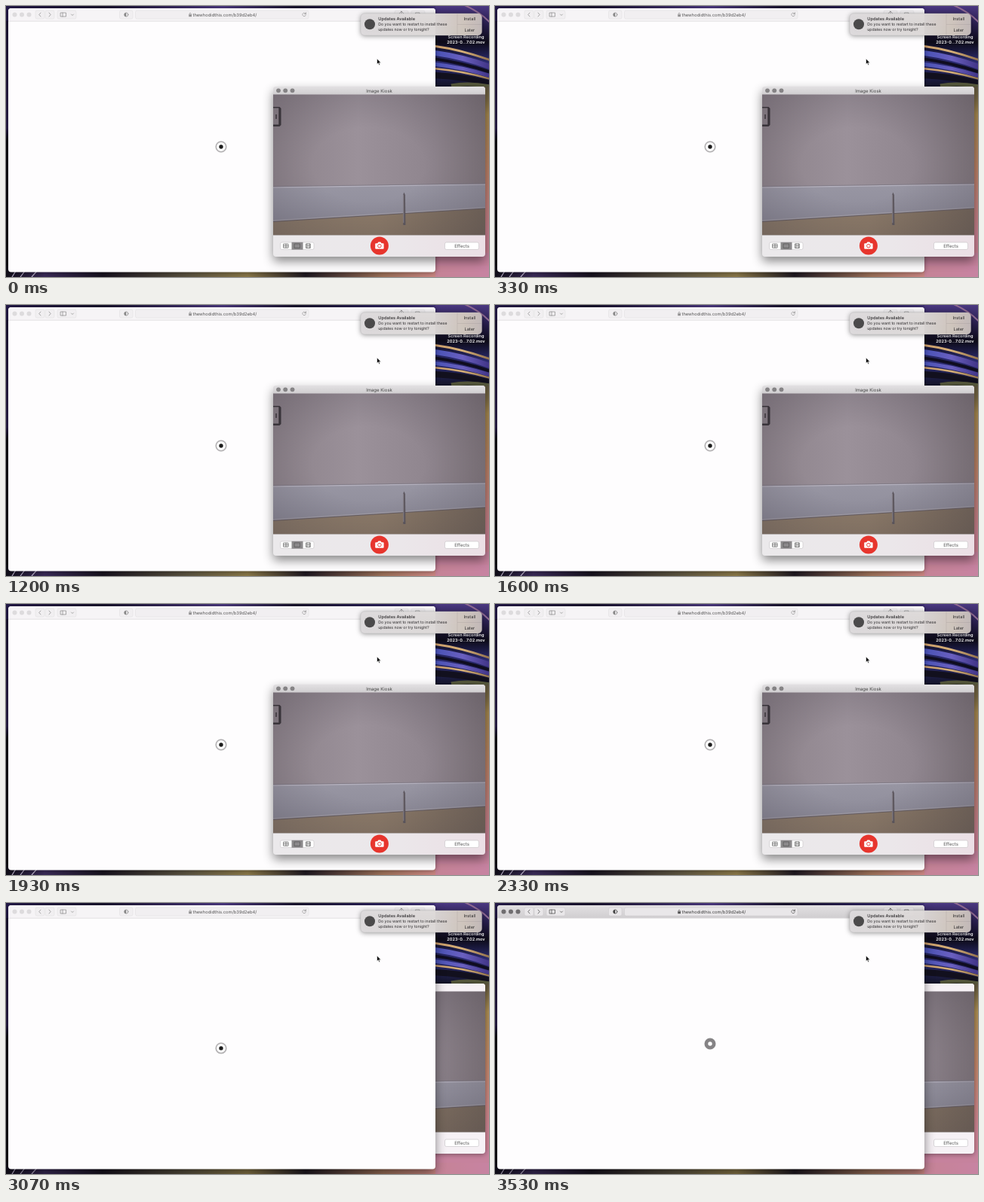
Recreate the animation shown at these times as an HTML page. Size 640 px wide and 360 px high, loop 3.59 s.

```html
<!DOCTYPE html>
<html lang="en">
<head>
<meta charset="utf-8">
<title>Desktop recording</title>
<style>
html, body { margin: 0; width: 100%; height: 100%; overflow: hidden; background: #0b0a14; }
svg { display: block; width: 640px; height: 360px; font-family: Inter, "Open Sans", sans-serif; text-rendering: geometricPrecision; }
.mid { text-anchor: middle; }
.line { fill: none; stroke: #777; stroke-width: .7; stroke-linecap: round; stroke-linejoin: round; }
.soft { filter: drop-shadow(0 1px 3px #0006); }
.deep { filter: drop-shadow(0 6px 7px #0007); }

#browser .bar { fill: #f6f4f6; }
#browser .light { fill: #dddbdd; }
#browser .tools { opacity: .6; }
#browser .field { fill: #f1eff1; stroke: #dfdddf; stroke-width: .5; }
#browser .url { fill: #555; font-size: 5.8px; }
.active #browser .bar { fill: url(#chrome); }
.active #browser .light { fill: #706e70; }
.active #browser .tools { opacity: 1; }
.active #browser .field { fill: #e9e7e9; stroke: #c9c7c9; }
.active #browser .url { fill: #3c3c3c; }

#radio .ring { fill: #fff; stroke: #b2b0b2; stroke-width: 1.5; }
#radio .dot { fill: #1d1d1d; }
.active #radio .ring { fill: #858385; stroke: #858385; }
.active #radio .dot { fill: #fff; }

#booth .bar { fill: url(#chrome); }
#booth .base { fill: url(#tray); }
.behind #booth .bar, .behind #booth .base { fill: #f6f1f5; }
</style>
</head>
<body>
<svg id="stage" viewBox="0 0 640 360">
<defs>
  <linearGradient id="chrome" x2="0" y2="1"><stop stop-color="#e2e0e2"/><stop offset="1" stop-color="#d0ced0"/></linearGradient>
  <linearGradient id="tray"><stop stop-color="#ebe9eb"/><stop offset=".6" stop-color="#ebe7ea"/><stop offset="1" stop-color="#ebdfe5"/></linearGradient>
  <linearGradient id="top"><stop stop-color="#241a48"/><stop offset=".2" stop-color="#17112b"/><stop offset=".45" stop-color="#4b3880"/><stop offset=".6" stop-color="#17122b"/><stop offset=".8" stop-color="#2c2260"/><stop offset="1" stop-color="#54408c"/></linearGradient>
  <linearGradient id="bottom"><stop stop-color="#100d18"/><stop offset=".08" stop-color="#3a2a58"/><stop offset=".2" stop-color="#17121e"/><stop offset=".38" stop-color="#5c5440"/><stop offset=".5" stop-color="#8a7848"/><stop offset=".62" stop-color="#1e1820"/><stop offset=".78" stop-color="#9c7058"/><stop offset=".88" stop-color="#c98580"/><stop offset="1" stop-color="#cf86a0"/></linearGradient>
  <linearGradient id="left" x2="0" y2="1"><stop stop-color="#1a1330"/><stop offset=".45" stop-color="#2b1f4a"/><stop offset=".5" stop-color="#08070c"/><stop offset="1" stop-color="#0c0a12"/></linearGradient>
  <linearGradient id="right" x2="0" y2="1"><stop offset=".28" stop-color="#4c4838"/><stop offset=".4" stop-color="#a88a50"/><stop offset=".6" stop-color="#c08468"/><stop offset=".85" stop-color="#cc8294"/></linearGradient>
  <linearGradient id="night" x2="0" y2="1"><stop stop-color="#4a3880"/><stop offset=".25" stop-color="#251c48"/><stop offset=".45" stop-color="#0d0b18"/><stop offset=".7" stop-color="#2c2c72"/><stop offset="1" stop-color="#15152a"/></linearGradient>
  <linearGradient id="gold"><stop stop-color="#c89a68"/><stop offset=".5" stop-color="#d6b078"/><stop offset="1" stop-color="#8a6a48"/></linearGradient>
  <linearGradient id="blue"><stop stop-color="#4450b4"/><stop offset=".5" stop-color="#6a60c0"/><stop offset="1" stop-color="#3c2f80"/></linearGradient>
  <linearGradient id="wall"><stop stop-color="#8c828a"/><stop offset=".4" stop-color="#9b919a"/><stop offset=".75" stop-color="#8f858e"/><stop offset="1" stop-color="#847a80"/></linearGradient>
  <linearGradient id="board" x2="0" y2="1"><stop stop-color="#9896a3"/><stop offset="1" stop-color="#8c8a98"/></linearGradient>
  <linearGradient id="floor"><stop stop-color="#8a7968"/><stop offset=".5" stop-color="#8d7b69"/><stop offset="1" stop-color="#7a6b5d"/></linearGradient>
  <radialGradient id="shade" cx=".45" cy=".5" r=".75"><stop offset=".35" stop-color="#38323c" stop-opacity="0"/><stop offset="1" stop-color="#38323c" stop-opacity=".32"/></radialGradient>
  <linearGradient id="streak" x2="0" y2="1"><stop stop-color="#bdb7c0" stop-opacity=".9"/><stop offset=".35" stop-color="#9a939a" stop-opacity=".85"/><stop offset="1" stop-color="#433c40"/></linearGradient>
  <linearGradient id="glass"><stop stop-color="#dedbdd"/><stop offset=".6" stop-color="#dfdbda"/><stop offset=".85" stop-color="#d6ccc2"/><stop offset="1" stop-color="#c9c0be"/></linearGradient>
  <clipPath id="photo"><path d="M354 117.500h281v187H354z"/></clipPath>
  <clipPath id="page"><path d="M3 20.500h566v333H3z"/></clipPath>
  <clipPath id="corner"><path d="M569 0h71v107h-71z"/></clipPath>
</defs>

<g id="desktop">
  <path fill="url(#left)" d="M0 0h320v360H0z"/>
  <path fill="url(#right)" d="M320 0h320v360H320z"/>
  <path fill="url(#top)" d="M0 0h640v20H0z"/>
  <path fill="url(#bottom)" d="M0 345h640v15H0z"/>
  <path fill="#c482a4" d="M569 328h71v32h-71z" opacity=".6"/>
  <path stroke="#b8aec8" stroke-width="1.200" d="M8 360l5-8M19 360l6-8M34 360l7-8"/>
  <g clip-path="url(#corner)" fill="none">
    <path fill="url(#night)" d="M569 0h71v107h-71z"/>
    <path stroke="#8f6a92" stroke-width="2" d="M600 -4Q628 6 645 26"/>
    <path stroke="url(#gold)" stroke-width="3" d="M565 53Q600 57 645 73"/>
    <path stroke="url(#blue)" stroke-width="7" d="M565 62Q605 67 645 82"/>
    <path stroke="#0f0d20" stroke-width="4" d="M565 70Q605 75 645 89"/>
    <path stroke="url(#blue)" stroke-width="5" d="M565 77Q605 81 645 94"/>
    <path stroke="url(#gold)" stroke-width="2.500" d="M565 83Q605 86 645 98"/>
    <path stroke="#12101e" stroke-width="8" d="M565 92Q605 93 645 104"/>
    <path stroke="#56583c" stroke-width="5" d="M590 106Q615 101 645 108"/>
  </g>
  <g class="mid" fill="#fff" font-size="5.6" font-weight="600">
    <text x="609.500" y="43">Screen Recording</text>
    <text x="609.500" y="50">2023-0…7.02.mov</text>
  </g>
</g>

<g id="browser" class="soft">
  <rect x="3" y="3" width="566" height="350.500" rx="4" fill="#fefdfe"/>
  <path class="bar" d="M3 20V7q0-4 4-4h558q4 0 4 4v13z"/>
  <path fill="#d9d7d9" d="M3 19.800h566v.6H3z"/>
  <g class="light"><circle cx="11.500" cy="11.500" r="3"/><circle cx="21" cy="11.500" r="3"/><circle cx="30.500" cy="11.500" r="3"/></g>
  <g class="field">
    <rect x="39" y="6" width="12" height="11" rx="2"/><rect x="52" y="6" width="12" height="11" rx="2"/>
    <rect x="68" y="6" width="25" height="11" rx="2"/><rect x="150.500" y="6" width="17.500" height="11" rx="2"/>
    <rect x="171.500" y="6" width="229.500" height="11" rx="2"/>
    <rect x="515" y="6" width="18" height="11" rx="2"/><rect x="537" y="6" width="18" height="11" rx="2"/>
  </g>
  <g class="tools">
    <path class="line" style="stroke:#444" d="M46 9l-2.200 2.500 2.200 2.500M57 9l2.200 2.500L57 14M72.500 9h7v5h-7zM75 9v5M86.500 11l1.500 1.500 1.500-1.500M521.500 9.500v5h5v-5M524 12V7l-1.500 1.500M524 7l1.500 1.500M543 9h5v5h-5z"/>
    <circle class="line" style="stroke:#444" cx="159.300" cy="11.500" r="2.600"/><path fill="#444" d="M159.300 8.900a2.600 2.600 0 0 0 0 5.200z"/>
    <path class="line" style="stroke:#555" d="M397.300 10.500a2.300 2.300 0 1 0 .1 1.500M397.400 8.600v2h-2"/>
    <path fill="#555" d="M242.200 11.200h3.800v3h-3.800z"/><path class="line" style="stroke:#555" d="M243 11v-1q1.100-2 2.200 0v1"/>
  </g>
  <text class="url" x="247.500" y="13.700">thewhodidthis.com/b39d2eb4/</text>
  <g clip-path="url(#page)">
    <g id="radio">
      <circle r="8" fill="#0001"/>
      <circle class="ring" r="6.700"/>
      <circle class="dot" r="2.700"/>
    </g>
  </g>
</g>

<g id="booth" class="deep">
  <rect class="base" x="354" y="107" width="281" height="226" rx="4"/>
  <path class="bar" d="M354 117.500V111q0-4 4-4h273q4 0 4 4v6.500z"/>
  <g fill="#858385"><circle cx="361" cy="112.300" r="2.900"/><circle cx="370.200" cy="112.300" r="2.900"/><circle cx="379.500" cy="112.300" r="2.900"/></g>
  <text class="mid" x="494.500" y="114.500" font-size="6" fill="#444">Image Kiosk</text>
  <g clip-path="url(#photo)">
    <path fill="url(#wall)" d="M354 117h281v130H354z"/>
    <path fill="url(#board)" d="M354 241.500L635 237v45L354 292z"/>
    <path fill="url(#floor)" d="M354 286.500L635 269v40H354z"/>
    <path stroke="#b3b0bd" stroke-width="1.500" d="M354 241L635 237"/>
    <path stroke="#7b7682" stroke-width=".8" d="M354 239.800L635 235.800"/>
    <path stroke="#a5a1aa" stroke-width="1" d="M354 285L635 267.500"/>
    <path stroke="#675d5e" stroke-width="1" d="M354 286.500L635 269"/>
    <path fill="url(#shade)" d="M354 117h281v188H354z"/>
    <path fill="#39343a" d="M354 134h8.500l2 2v22l-2 2H354z"/>
    <path fill="#7d747c" d="M354 135.500h7.300v22H354z"/>
    <path fill="#4a444a" d="M357 144h2v6h-2z"/>
    <g transform="translate(528 291)">
      <g id="pencil">
        <path id="blur" fill="url(#streak)" d="M-1.700 0L-5.500-38L-4-41L4-42L4.500-38L1.700 0z"/>
        <g id="shaft">
          <path fill="#59535a" d="M-1.700 0V-40L-.7-43.500L.9-40L1.400 0z"/>
          <path stroke="#99929a" stroke-width=".7" d="M-1.200-40V-3"/>
        </g>
      </g>
    </g>
  </g>
  <path fill="#bab8ba" d="M354 304.500h281v.5H354z"/>
  <rect x="363.500" y="314" width="44.500" height="9.500" rx="2" fill="#fff" stroke="#c4c2c4" stroke-width=".6"/>
  <path fill="#8b898b" d="M378.500 313.800h15v9.900h-15z"/>
  <path class="line" style="stroke:#555" d="M368 316.200h6v5h-6zM371 316.200v5M368 318.700h6M397.800 316h5.500v5.500h-5.500zM399 316v5.500M402.100 316v5.500M399 318.700h3.100"/>
  <path class="line" style="stroke:#555" d="M382.500 316h7v5.500h-7z"/>
  <circle cx="494.900" cy="318.400" r="12" fill="#e7352d"/>
  <path fill="#fff" d="M490.200 315.200h2l1.200-1.600h3l1.200 1.600h2q1 0 1 1v5.600q0 1-1 1h-9.400q-1 0-1-1v-5.600q0-1 1-1z"/>
  <circle cx="494.900" cy="318.700" r="2.300" fill="#fff" stroke="#e7352d" stroke-width=".9"/>
  <rect x="581.500" y="314" width="45" height="9.500" rx="2" fill="#fff" stroke="#c4c2c4" stroke-width=".6"/>
  <text class="mid" x="604" y="320.800" font-size="6" fill="#555">Effects</text>
</g>

<g id="notice">
  <rect class="soft" x="470" y="10" width="160.500" height="29" rx="5" fill="url(#glass)" fill-opacity=".96" stroke="#b9b5b8" stroke-width=".4"/>
  <circle cx="482" cy="24.300" r="7" fill="#4b4a4b"/>
  <g fill="#2d2b2d" font-size="5.200">
    <text x="493.300" y="18.600" font-size="5.700" font-weight="500">Updates Available</text>
    <text x="493.300" y="26.200">Do you want to restart to install these</text>
    <text x="493.300" y="33">updates now or try tonight?</text>
    <g class="mid" font-size="5.700"><text x="614.300" y="18.700">Install</text><text x="614.300" y="33.900">Later</text></g>
  </g>
  <path stroke="#0002" stroke-width=".5" d="M598 10.500v28M598 24.500h32"/>
</g>
<path fill="#000" stroke="#fff" stroke-width=".6" d="M491.600 70v7.300l1.700-1.500 1.100 2.600 1.200-.5-1.100-2.500h2.300z"/>
</svg>

<script>
const LOOP = 3590, STEP = 200 / 3;
const KICK = 2733, RAISE = 3060, FOCUS = 3130;
const $ = id => document.getElementById(id);
const stage = $('stage'), radio = $('radio'), pencil = $('pencil');
const browser = $('browser'), booth = $('booth'), notice = $('notice');
let raised = null;

// The pencil topples ever faster; the button is kicked down and eases home.
const lean = t => t < 2390 ? 0 : Math.min(88, 27 * Math.exp((t - KICK) / 66));
const height = t => t < KICK - 5 ? 187 : 187 + 166 * Math.exp((KICK - t) / 100);

function raise(on) {
  if (on === raised) return;
  raised = on;
  notice.before(on ? browser : booth);
  stage.classList.toggle('behind', on);
  browser.setAttribute('class', on ? 'deep' : 'soft');
  booth.setAttribute('class', on ? 'soft' : 'deep');
}

function draw(now) {
  const t = Math.floor((now % LOOP + 3.4) / STEP) * STEP;
  const angle = lean(t);
  const moving = angle > 6 && angle < 88;
  radio.setAttribute('transform', `translate(285 ${height(t)})`);
  pencil.setAttribute('transform', `rotate(${-angle})`);
  $('blur').setAttribute('opacity', moving ? 1 : 0);
  $('shaft').setAttribute('opacity', moving ? 0 : 1);
  raise(t >= RAISE);
  stage.classList.toggle('active', t >= FOCUS);
}

const start = performance.now();
function tick() {
  draw(performance.now() - start);
  requestAnimationFrame(tick);
}
tick();
</script>
</body>
</html>
```
